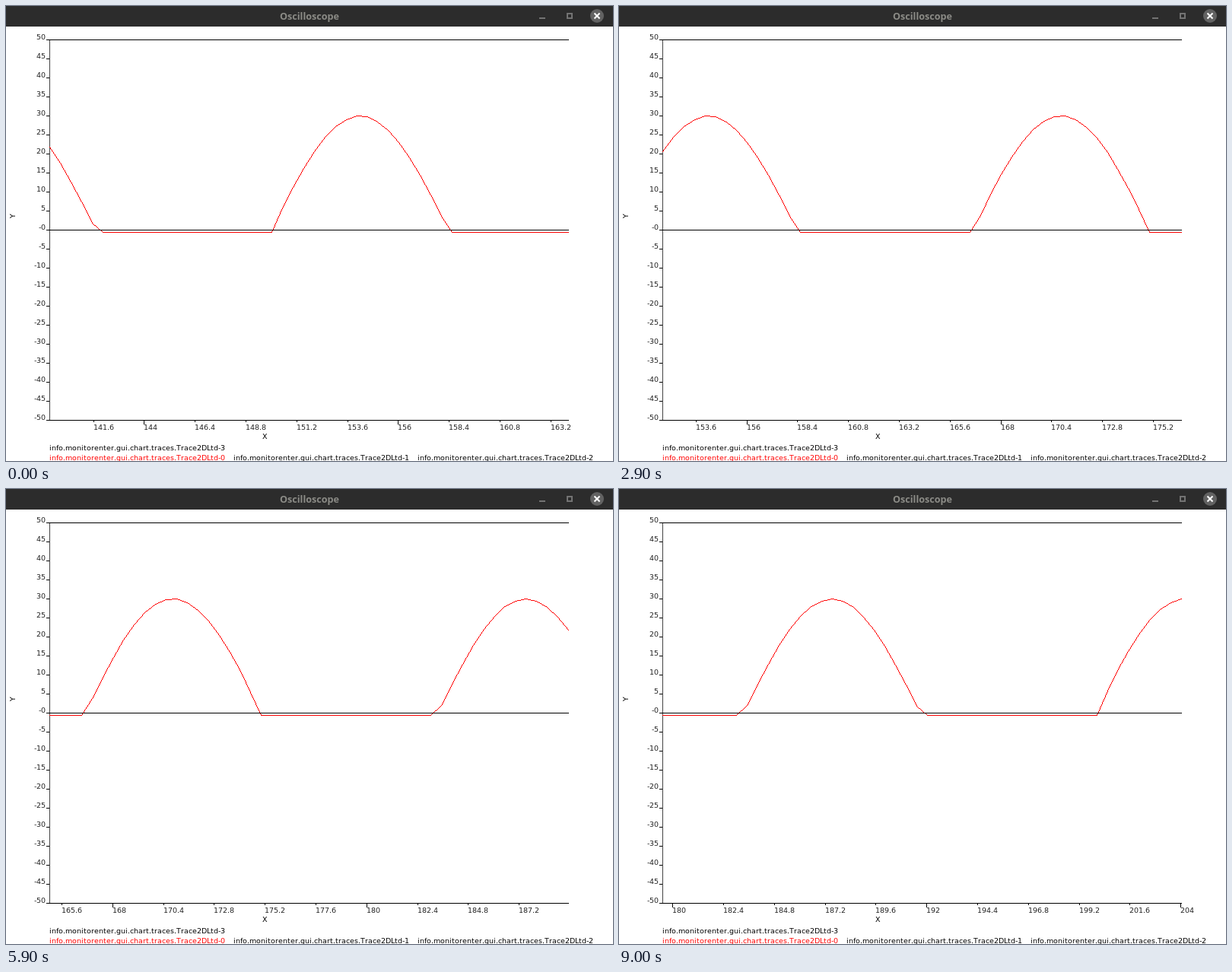
Write an HTML page with a canvas that moves like this. It is 798 by 598 pixels and loops after 9100 ms.

```html
<!DOCTYPE html>
<html lang="en">
<head>
<meta charset="utf-8">
<title>Oscilloscope</title>
<style>
  html, body { margin: 0; width: 100%; height: 100%; overflow: hidden; background: #fff; }
  canvas { display: block; }
</style>
</head>
<body>
<canvas id="stage" width="798" height="598"></canvas>
<script>
const ctx = document.getElementById('stage').getContext('2d');
const LOOP = 9100, TICK = 100;
const REPAINT = 1.715, PHASE = 0.17; // in ticks
const LEFT = 57, RIGHT = 739, TOP = 44, ZERO = 294, BOTTOM = 544;
const POINTS = 50, STEP = 0.5, START = 139.511;
const SPAN = (POINTS - 1) * STEP;
const SMALL = '9.5px "DejaVu Sans", sans-serif';

// Sampling speed drifts a little: [tick, samples received]
const PACE = [[0, 0], [29, 25], [59, 51], [90, 80]];

function samplesAt(tick) {
  const i = Math.max(1, PACE.findIndex(p => p[0] >= tick));
  const [t0, n0] = PACE[i - 1], [t1, n1] = PACE[i];
  return Math.floor(n0 + (n1 - n0) * (tick - t0) / (t1 - t0) + 0.4);
}

// The tick at which the chart was last repainted
function lastRepaint(tick) {
  const k = Math.floor((tick + PHASE) / REPAINT);
  return Math.max(0, Math.ceil(k * REPAINT - PHASE));
}

// Half-wave rectified sine
function signal(x) {
  const v = 30 * Math.sin(2 * Math.PI * 0.06 * x);
  return v > 0.5 ? v : -0.5;
}

const toX = d => LEFT + d * (RIGHT - LEFT) / SPAN;
const toY = v => ZERO - 5 * v;

function rect(x, y, w, h, color) {
  ctx.fillStyle = color;
  ctx.fillRect(x, y, w, h);
}

// Whole-pixel glyph advances
const advance = c => Math.round(ctx.measureText(c).width);

function label(text, x, y, color = '#000', alignRight = false) {
  ctx.font = SMALL;
  ctx.textAlign = 'left';
  ctx.fillStyle = color;
  if (alignRight) for (const c of text) x -= advance(c);
  for (const c of text) {
    ctx.fillText(c, x, y);
    x += advance(c);
  }
}

// Line without smoothing
function pixelLine(x0, y0, x1, y1) {
  const n = Math.max(Math.abs(x1 - x0), Math.abs(y1 - y0), 1);
  for (let i = 0; i <= n; i++) {
    ctx.fillRect(Math.round(x0 + (x1 - x0) * i / n), Math.round(y0 + (y1 - y0) * i / n), 1, 1);
  }
}

function titleBar() {
  rect(0, 0, 798, 27, '#2c2c2c');
  ctx.font = 'bold 12.6px "Open Sans", sans-serif';
  ctx.textAlign = 'center';
  ctx.fillStyle = '#8b8b86';
  ctx.fillText('Oscilloscope', 399, 18);

  rect(701, 15, 8, 2, '#737373');
  ctx.strokeStyle = '#737373';
  ctx.lineWidth = 2;
  ctx.strokeRect(738, 10, 6, 6);

  ctx.fillStyle = '#626262';
  ctx.beginPath();
  ctx.arc(777, 13, 9, 0, 2 * Math.PI);
  ctx.fill();
  ctx.strokeStyle = '#fff';
  ctx.beginPath();
  ctx.moveTo(773.5, 9.5); ctx.lineTo(780.5, 16.5);
  ctx.moveTo(780.5, 9.5); ctx.lineTo(773.5, 16.5);
  ctx.stroke();
}

function axes(from) {
  rect(LEFT, TOP, 1, 501, '#444');
  rect(LEFT, TOP, 683, 1, '#000');
  rect(LEFT, BOTTOM, 683, 1, '#000');

  for (let v = 50; v >= -50; v -= 5) {
    rect(53, toY(v), 4, 1, '#000');
    label(v ? String(v) : '-0', 52, toY(v), '#222', true);
  }

  for (let k = Math.ceil(from / 2.4); k * 2.4 <= from + SPAN; k++) {
    const v = k * 2.4;
    const x = Math.floor(toX(v - from));
    rect(x, BOTTOM, 1, k % 5 ? 3 : 6, '#000');
    label(String(+v.toFixed(1)), x, 557, '#222');
  }

  label('X', 337, 569);
  ctx.save();
  ctx.translate(12, 279);
  ctx.rotate(-Math.PI / 2);
  label('Y', 0, 0);
  ctx.restore();
}

function legend() {
  const name = 'info.monitorenter.gui.chart.traces.Trace2DLtd-';
  label(name + 3, 57, 584);
  for (let i = 0; i < 3; i++) label(name + i, 57 + 242 * i, 597, i ? '#000' : '#f00');
}

function trace(from) {
  ctx.fillStyle = '#f00';
  let px, py;
  for (let i = 0; i < POINTS; i++) {
    const x = Math.round(toX(i * STEP));
    const y = Math.round(toY(signal(from + i * STEP)));
    if (i) pixelLine(px, py, x, y);
    px = x;
    py = y;
  }
}

function draw(count) {
  const from = START + count * STEP;
  rect(0, 0, 798, 598, '#fff');
  titleBar();
  axes(from);
  trace(from);
  rect(LEFT, ZERO, 683, 1, '#000');
  legend();
}

let shown = -1;
function frame() {
  const tick = Math.floor(performance.now() % LOOP / TICK);
  const count = samplesAt(lastRepaint(tick));
  if (count !== shown) draw(shown = count);
  requestAnimationFrame(frame);
}
frame();
</script>
</body>
</html>
```
